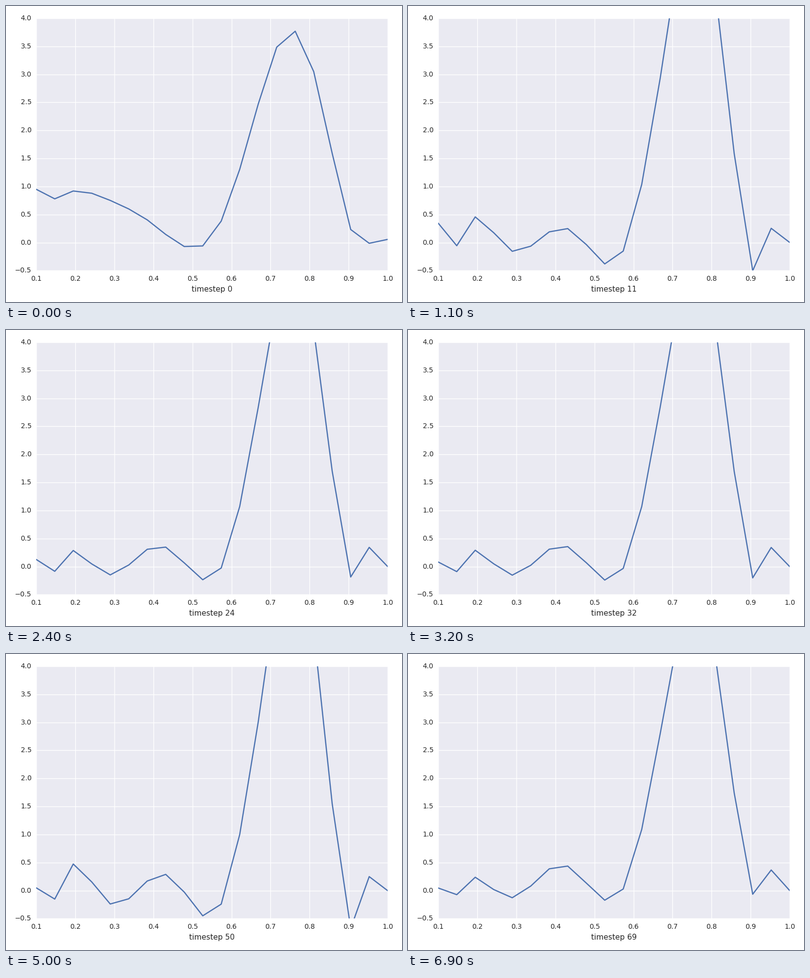
Recreate the animation shown at these times as a matplotlib script. Size 800 by 600 pixels, loop 7000 ms.

```python
import matplotlib.pyplot as plt
import numpy as np
from matplotlib.animation import FuncAnimation

W, H, DPI = 800, 600, 100
FRAMES, INTERVAL = 70, 100
LEFT, RIGHT, TOP, BOTTOM = 61.12, 771.12, 25, 536.35
INK, PANEL, BLUE = "#262626", "#EAEAF2", "#4C72B0"

plt.rcParams["font.family"] = "DejaVu Sans"

# Vertices of the first curve and of the one it settles to
START = np.array([.95, .78, .92, .88, .752, .60, .405, .145, -.07, -.06,
                  .383, 1.307, 2.47, 3.486, 3.77, 3.05, 1.59, .233, -.013, .057])
SETTLED = np.array([.045, -.073, .238, .018, -.128, .08, .388, .437, .135, -.172,
                    .028, 1.09, 2.8, 4.59, 5.1, 4.13, 1.74, -.065, .367, 0])
K = np.arange(len(START))


def bump(center, width, height):
    return height * np.exp(-((K - center) / width) ** 2 / 2)


# Overshoot: the peak rises while its surroundings sink
SWING = (bump(13.8, 1.05, 1.0) - bump(16.8, 0.65, 0.65)
         - bump(9.5, 1.1, 0.3) - bump(5.3, 1.3, 0.23)
         + bump(2.3, 0.8, 0.27) - bump(1, 0.4, 0.15))
SLOW_HILL = bump(7, 1, 0.1)
FADE_TIME = 4 + bump(0, 0.45, 6)    # the left end settles last


def curve(step):
    swing = np.interp(step, [11, 24, 40, 50, 59, 69],
                      [0.8, 0.2, 0.25, 1, 0.7, 0])
    rest = SETTLED + swing * SWING - (1 - step / (FRAMES - 1)) * SLOW_HILL
    return rest + (START - rest) * np.exp(-step / FADE_TIME)


fig = plt.figure(figsize=(W / DPI, H / DPI), dpi=DPI, facecolor="white")
ax = fig.add_axes([LEFT / W, 1 - BOTTOM / H,
                   (RIGHT - LEFT) / W, (BOTTOM - TOP) / H], facecolor=PANEL)
ax.set_xlim(0.1, 1.0)
ax.set_ylim(-0.5, 4.0)
ax.set_xticks(np.linspace(0.1, 1.0, 10))
ax.set_yticks(np.linspace(-0.5, 4.0, 10))
ax.xaxis.set_major_formatter("{x:.1f}")
ax.yaxis.set_major_formatter(lambda v, _: f"{v:.1f}".replace("-", "\u2212"))
ax.tick_params(length=0, pad=7, labelsize=10, labelcolor=INK)
for label in ax.get_yticklabels():
    label.set_va("center")
ax.set_axisbelow(True)
ax.grid(color="white", linewidth=1, linestyle="-")
for spine in ax.spines.values():
    spine.set_visible(False)

line, = ax.plot(np.linspace(0.1, 1.0, len(K)), START, color=BLUE,
                linewidth=1.75, solid_capstyle="round")
caption = fig.text((LEFT + RIGHT) / 2 / W, 21 / H, "timestep 0", color=INK,
                   fontsize=11, ha="center", va="baseline")


def update(step):
    line.set_ydata(curve(step))
    caption.set_text(f"timestep {step}")
    return line, caption


anim = FuncAnimation(fig, update, frames=FRAMES, interval=INTERVAL,
                     repeat=True)
plt.show()
```
